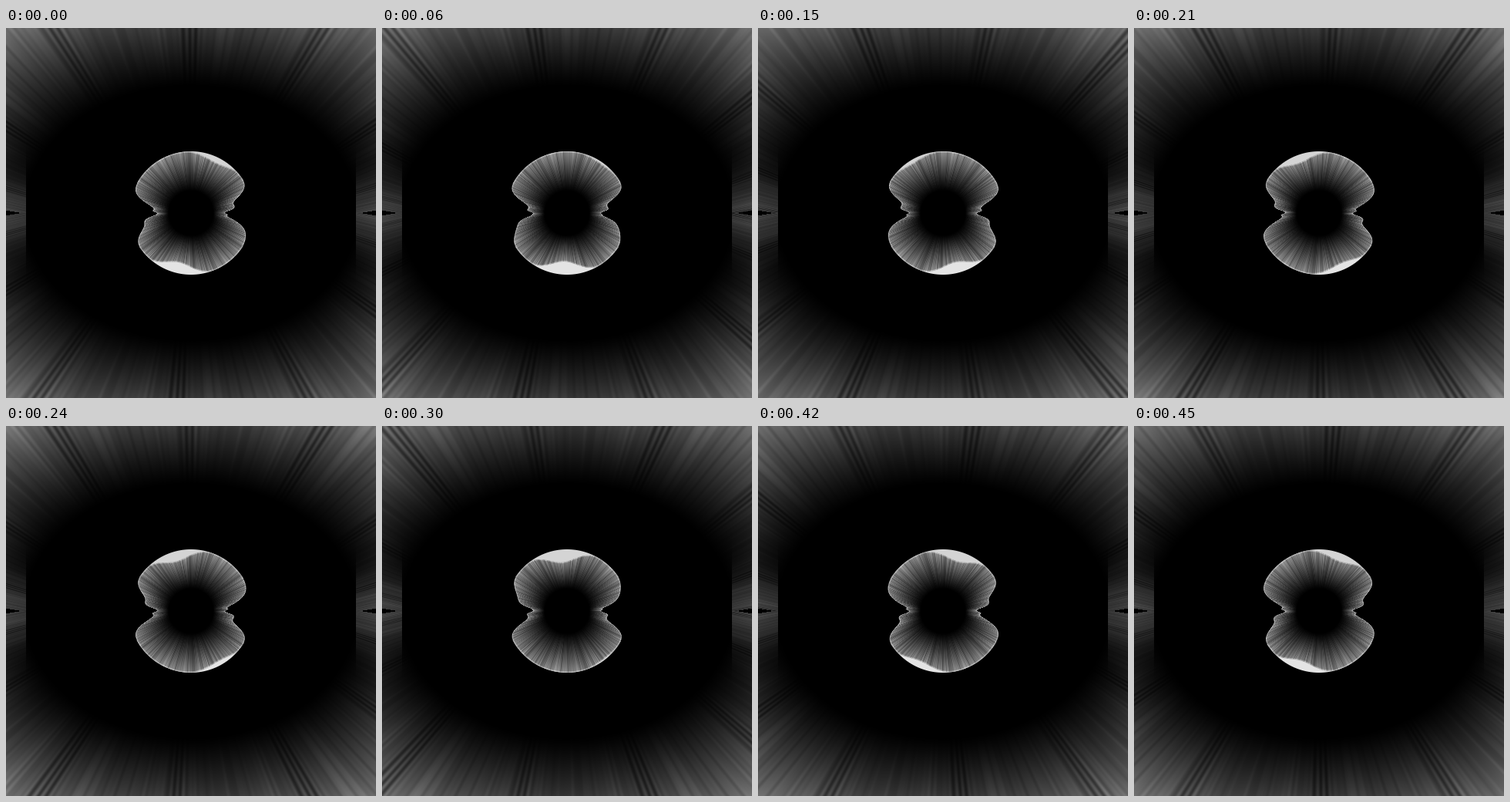
Recreate the animation shown at these times as an HTML page with a canvas. Size 480 by 480 pixels, loop 480 ms.

```html
<!DOCTYPE html>
<html>
<head>
<meta charset="utf-8">
<style>
html, body { margin: 0; height: 100%; overflow: hidden; background: #000; }
canvas { display: block; }
</style>
</head>
<body>
<canvas id="stage" width="480" height="480"></canvas>
<script>
const SIZE = 480, LOOP = 480, STEP = 30, RADIUS = 80, CORE = 29, TABLE = 4096;
const ctx = document.getElementById('stage').getContext('2d');
const image = ctx.createImageData(SIZE, SIZE);
image.data.fill(255);

const clamp = (v, lo = 0, hi = 1) => Math.min(hi, Math.max(lo, v));
const smooth = v => v * v * (3 - 2 * v);
const hash = n => { const v = Math.sin(n * 127.1 + 3.7) * 43758.5453; return v - Math.floor(v); };

// Value noise that repeats when q grows by 1
function noise(q, cells) {
  const p = q * cells, i = Math.floor(p), f = smooth(p - i);
  const at = k => hash((k % cells) + cells * 7);
  return at(i) * (1 - f) + at(i + 1) * f;
}

const makeTable = fn => Float32Array.from({ length: TABLE }, (_, i) => fn(i / TABLE));
const sample = (table, q) => table[Math.floor((q - Math.floor(q)) * TABLE)];

const wallStreaks = makeTable(q => {
  const band = Math.max(0, Math.cos(4 * Math.PI * q)) ** 5;
  return 1 + 0.25 * (noise(q, 19) - 0.5) + 0.25 * (noise(q, 83) - 0.5)
    + band * (0.25 * Math.sin(2 * Math.PI * 39 * q) - 0.15);
});
const shellStreaks = makeTable(q =>
  0.9 + 0.25 * (noise(q, 61) - 0.5) + 0.4 * (noise(q, 173) - 0.5));

// Parts of the picture that do not depend on time
const wall = [], shell = [];
for (let y = 0; y < SIZE; y++) {
  for (let x = 0; x < SIZE; x++) {
    const dx = x + 0.5 - 240, dy = y + 0.5 - 240, low = dy > 0;
    const ax = Math.abs(dx), ay = Math.abs(dy), r = Math.hypot(dx, dy);
    const index = (y * SIZE + x) * 4;
    if (r < RADIUS + 1) {
      const upright = ay / r, angle = Math.acos(upright) * 180 / Math.PI;
      const u = Math.atanh(clamp(dx / r, -0.999, 0.999));
      const bias = 16 - 73 * (1 - upright);
      const swing = 22 * upright ** 0.8;
      const fold = smooth(clamp((angle - 50) / 28));
      shell.push({ index, r, u, bias, swing, fold, low });
    } else {
      let light = 140 * Math.max(0, Math.hypot(dx / 215, dy / 165) - 1) ** 1.2;
      if (ax > 214) light += 55 * Math.exp(-((ay / 42) ** 2));
      if (ay < (ax - 220) * 0.17) light = 0;
      if (light > 0) {
        const q = Math.asinh(dx / (0.85 * ay + 35)) / 1.36 + (low ? 0.05 : 0);
        wall.push({ index, light, q });
      }
    }
  }
}

function plot(index, v) {
  image.data[index] = image.data[index + 1] = image.data[index + 2] = v;
}

// Positive lift curls the rim forward and shows the white outer side
function shellLight(p, t) {
  const time = t + (p.low ? 255 : 0);
  const wave = p.bias + p.swing * Math.cos(2 * Math.PI * (time - 330 - 208 * p.u) / LOOP);
  const lift = wave < 0 ? wave * p.fold : wave;
  const edge = RADIUS * Math.cos(lift * Math.PI / 180);
  const streak = sample(shellStreaks, p.u * 208 / LOOP - time / LOOP);
  const inside = 140 * clamp((p.r - CORE) / (edge - CORE)) ** 1.1 * streak
    + 45 * clamp(1.3 - Math.abs(p.r - edge + 0.6));
  const outside = lift > -4 ? (p.low ? 228 : 212) * clamp(RADIUS + 0.5 - p.r) : 0;
  const cover = clamp(edge - p.r + 0.5);
  return inside * cover + outside * (1 - cover);
}

function draw(now) {
  const t = Math.floor((now % LOOP) / STEP) * STEP;
  for (const p of wall) plot(p.index, p.light * sample(wallStreaks, p.q + t / LOOP));
  for (const p of shell) plot(p.index, shellLight(p, t));
  ctx.putImageData(image, 0, 0);
}

let start;
function tick(now) {
  start ??= now;
  draw(now - start);
  requestAnimationFrame(tick);
}
for (let i = 0; i < image.data.length; i += 4) plot(i, 0);
draw(0);
requestAnimationFrame(tick);
</script>
</body>
</html>
```
